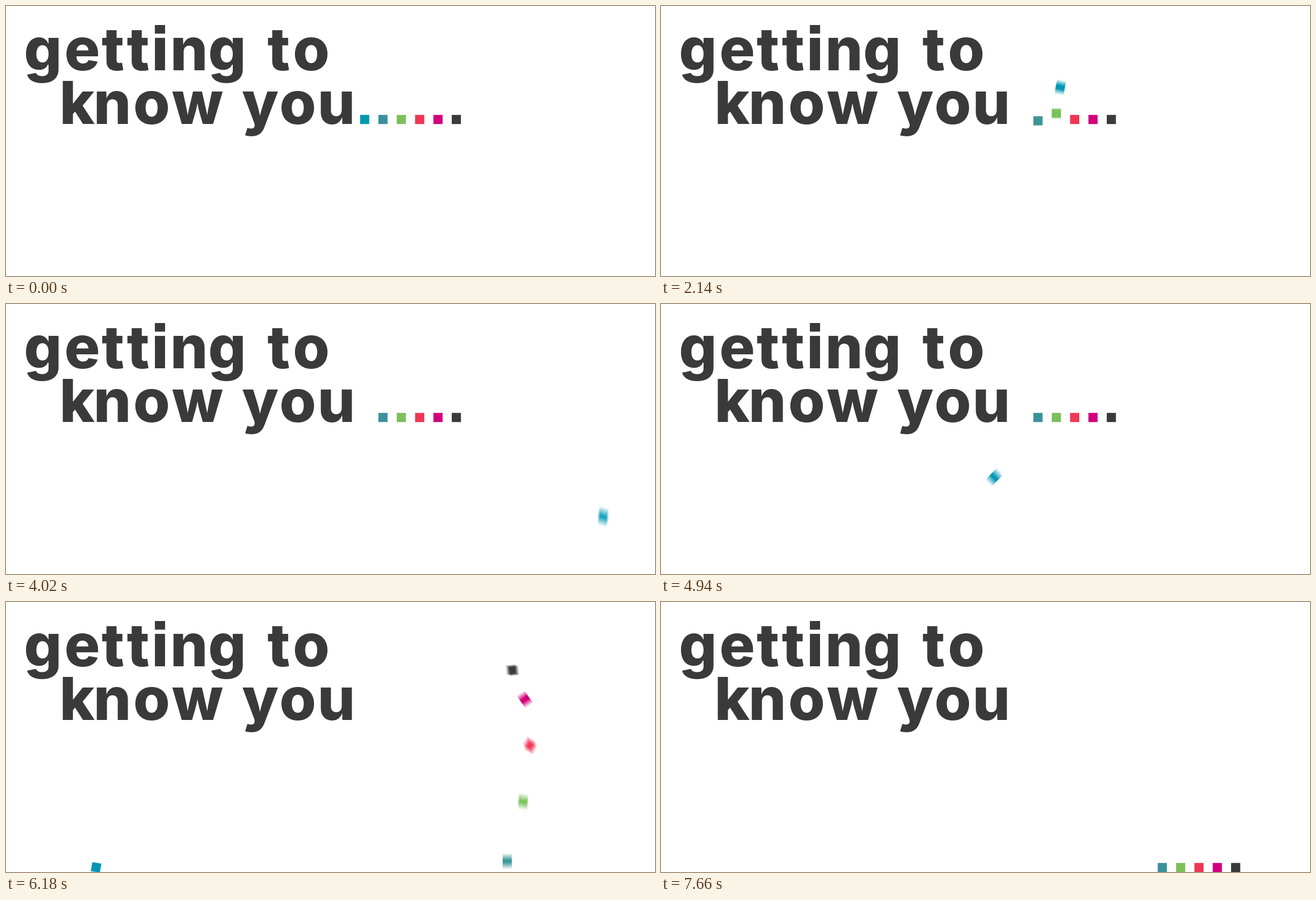
These frames come from a looping animation (1159 by 483 pixels, 8000 ms). An HTML page with a canvas:

```html
<!DOCTYPE html>
<html lang="en">
<head>
<meta charset="utf-8">
<title>getting to know you</title>
<style>
  html, body { margin: 0; width: 100%; height: 100%; overflow: hidden; background: #fff; }
  svg, canvas { position: absolute; left: 0; top: 0; display: block; }
  text {
    font: 800 106px Inter, "Noto Sans", sans-serif;
    font-feature-settings: "ss07";
    fill: #3a3a3a;
    text-anchor: middle;
  }
</style>
</head>
<body>
<svg width="1159" height="483" viewBox="0 0 1159 483">
  <text y="115" x="66 136 191 236 275 327 395 446 487 545">getting to</text>
  <text y="211" x="127 190 260 342 404 454 521 590">know you</text>
</svg>
<canvas id="stage" width="1159" height="483"></canvas>
<script>
const ctx = document.getElementById('stage').getContext('2d');
const LOOP = 8000, STEP = 40, FIRST = 1500, LAST = 7660;
const SHUTTER = 15, SAMPLES = 15;
const SIZE = 16.4, ROW = 203, FLOOR = 475;
const COLORS = ['#009aae', '#3a929b', '#7cbf5b', '#ee3754', '#d0007e', '#3a3a3a'];
const slotX = i => 640.5 + 32.75 * i;

// 0 to 1 between two times; a > 1 softens the start, b > 1 softens the end.
function ease(t, from, to, a = 1, b = 1) {
  const s = Math.min(1, Math.max(0, (t - from) / (to - from)));
  return 1 - (1 - s ** a) ** b;
}

const arc = s => 4 * s * (1 - s);

// Height of a series of hops that grow shorter and lower.
function bounce(t, start, len, height, shrink) {
  if (t < start) return 0;
  while (len > 50) {
    if (t < start + len) return height * arc((t - start) / len);
    start += len;
    len *= shrink;
    height *= shrink ** 1.7;
  }
  return 0;
}

// The leader hops along the row, flies off, rolls back along the floor and leaves.
const HOP_START = 1475, HOP = 300;
const contact = i => HOP_START + HOP * i;
const LAUNCH = contact(5), PEAK = 3415, LAND = 4095, STOP = 6450, LEAVE = 7240;
const FAR = 1069, NEAR = 146.5;

function hopping(t) {
  const n = Math.max(0, (t - HOP_START) / HOP), s = n % 1;
  return {
    x: slotX(n),
    y: ROW - 85 * arc(s),
    turn: 90 * s * s * (3 - 2 * s)
  };
}

function flying(t) {
  const rise = ease(t, LAUNCH, PEAK, 1, 2.8), fall = ease(t, PEAK, LAND, 2);
  return {
    x: slotX(5) + (FAR - slotX(5)) * ease(t, LAUNCH, LAND, 1.27, 1.87),
    y: ROW - 182 * rise + 454 * fall,
    turn: 200 * ease(t, LAUNCH, LAND, 1, 1.5)
  };
}

function rolling(t) {
  const roll = ease(t, LAND, STOP, 1.2, 2.085), exit = ease(t, LEAVE, LAST, 1.7);
  return {
    x: FAR + (NEAR - FAR) * roll - 170 * exit,
    y: FLOOR - bounce(t, LAND, 1040, 271, 0.52) - bounce(t, LEAVE, 320, 37, 0.5),
    turn: 200 - 650 * roll - 180 * exit
  };
}

const leader = t => t < LAUNCH ? hopping(t) : t < LAND ? flying(t) : rolling(t);

// The others spring when landed on, then follow one shared leap in turn.
const DELAY = 120, LEAP = 5300, TOP = 5680, TOUCH = 6195;

function spring(t) {
  if (t < 0) return 16 * ease(t, -45, 0);
  return 16 * Math.exp(-t / 200) * Math.cos(2 * Math.PI * t / 120);
}

function follower(i, t) {
  const own = t - DELAY * (i - 1);
  const rise = ease(own, LEAP, TOP, 2.2, 1.5), fall = ease(own, TOP, TOUCH, 1.5, 1.1);
  return {
    x: slotX(i) + 222 * ease(own, LEAP, 6260, 2.4, 4.6),
    y: ROW + spring(t - contact(i)) - 84 * rise + 356 * fall - bounce(own, TOUCH, 318, 26, 0.67),
    turn: -180 * ease(own, 5340, 6150, 1, 1.3)
  };
}

const pose = (i, t) => i ? follower(i, t) : leader(t);

function square({ x, y, turn }, alpha) {
  const a = turn * Math.PI / 180, c = Math.cos(a), s = Math.sin(a);
  ctx.globalAlpha = alpha;
  ctx.setTransform(c, s, -s, c, x, y);
  ctx.fillRect(-SIZE / 2, -SIZE / 2, SIZE, SIZE);
}

function draw(t) {
  ctx.setTransform(1, 0, 0, 1, 0, 0);
  ctx.clearRect(0, 0, 1159, 483);
  ctx.globalCompositeOperation = 'lighter';
  COLORS.forEach((color, i) => {
    ctx.fillStyle = color;
    const a = pose(i, t - SHUTTER / 2), b = pose(i, t + SHUTTER / 2);
    const moved = Math.hypot(a.x - b.x, a.y - b.y) + Math.abs(a.turn - b.turn) / 8;
    if (moved < 0.6) return square(pose(i, t), 1);
    for (let k = 0; k < SAMPLES; k++) {
      square(pose(i, t + SHUTTER * (k / (SAMPLES - 1) - 0.5)), 1 / SAMPLES);
    }
  });
}

const start = performance.now();
function tick(now) {
  const t = Math.max(0, now - start) % LOOP;
  const held = FIRST + Math.floor((t - FIRST) / STEP) * STEP;
  draw(t < FIRST ? 0 : Math.min(held, LAST));
  requestAnimationFrame(tick);
}
draw(0);
requestAnimationFrame(tick);
</script>
</body>
</html>
```
